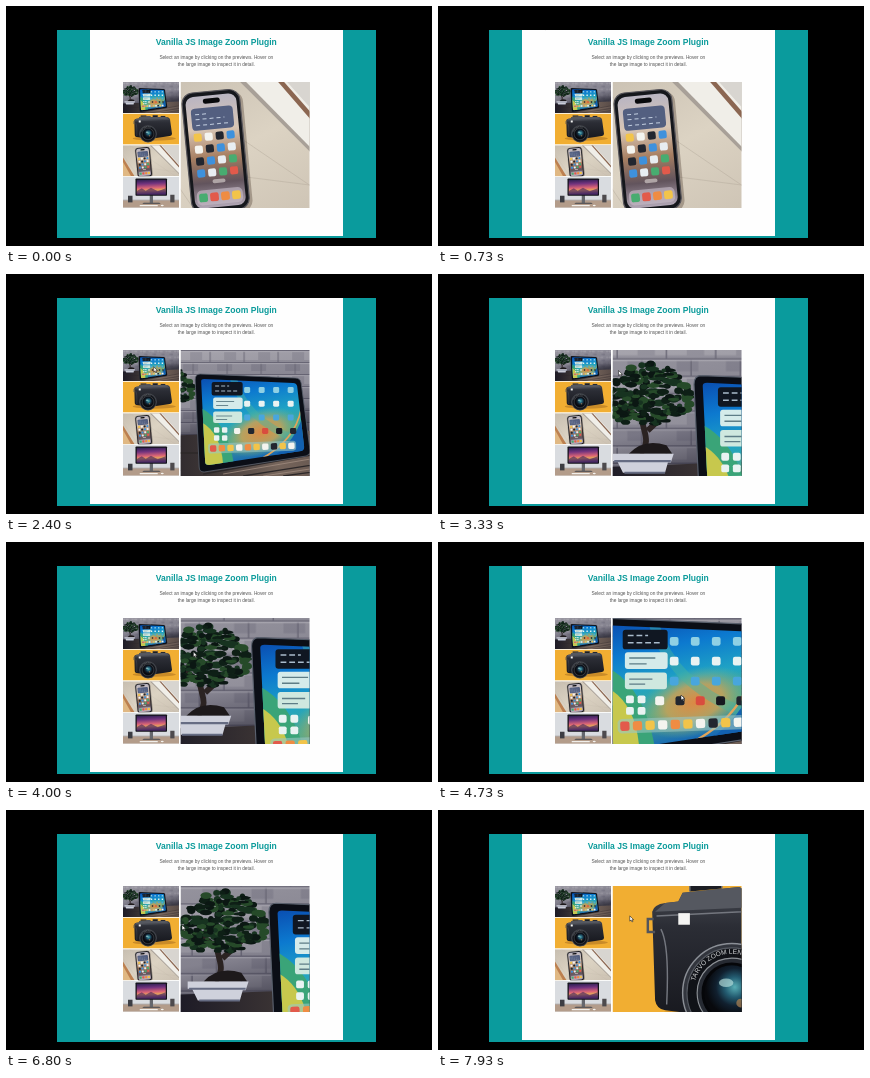
These frames come from a looping animation (426 px wide and 240 px high, 8 s). An HTML page:

```html
<!DOCTYPE html>
<html lang="en">
<head>
<meta charset="utf-8">
<title>Image Zoom Plugin</title>
<style>
html, body { margin: 0; width: 100%; height: 100%; overflow: hidden; background: #000; }
svg { display: block; }
#stage { width: 100vw; height: 100vh; }
text { font-family: "Liberation Sans", Arial, sans-serif; }
</style>
</head>
<body>
<svg id="stage" viewBox="0 0 426 240">
<defs>
  <clipPath id="page"><rect x="51" y="24" width="319" height="208"/></clipPath>
  <clipPath id="photo"><rect width="224" height="126"/></clipPath>
  <clipPath id="viewer"><rect x="174.8" y="76" width="128.7" height="126"/></clipPath>
  <pattern id="bricks" width="34" height="24" patternUnits="userSpaceOnUse">
    <rect width="34" height="24" fill="#a3a1aa"/>
    <rect x="1" y="2" width="22" height="8" fill="#b5b3ba"/>
    <rect x="16" y="14" width="15" height="7" fill="#94929d"/>
    <path d="M0 .5H34M0 12.5H34M9 0V12M26 12V24" stroke="#777582" stroke-width="1"/>
    <path d="M0 1.6H34M0 13.6H34" stroke="#cac8ce" stroke-width=".7"/>
  </pattern>
  <linearGradient id="wallShade" x2=".3" y2="1">
    <stop offset="0" stop-color="#211f35" stop-opacity=".08"/>
    <stop offset=".5" stop-color="#25233a" stop-opacity=".25"/>
    <stop offset=".8" stop-color="#161522" stop-opacity=".75"/>
  </linearGradient>
  <linearGradient id="table">
    <stop offset="0" stop-color="#1d1b26"/><stop offset=".35" stop-color="#3f3736"/>
    <stop offset=".65" stop-color="#76655b"/><stop offset="1" stop-color="#594c48"/>
  </linearGradient>
  <linearGradient id="wallpaper" x2=".25" y2="1">
    <stop offset="0" stop-color="#0a4fb2"/><stop offset=".25" stop-color="#0c79cf"/>
    <stop offset=".52" stop-color="#20a4c4"/><stop offset=".75" stop-color="#4aa78c"/><stop offset="1" stop-color="#1768b5"/>
  </linearGradient>
  <radialGradient id="glow">
    <stop offset="0" stop-color="#dc8844"/><stop offset=".5" stop-color="#d2a152" stop-opacity=".8"/>
    <stop offset="1" stop-color="#7cba80" stop-opacity="0"/>
  </radialGradient>
  <linearGradient id="sand" x2="1" y2="1">
    <stop offset="0" stop-color="#c7beb0"/><stop offset=".5" stop-color="#dcd3c3"/><stop offset="1" stop-color="#cbc1b2"/>
  </linearGradient>
  <linearGradient id="phoneScreen" x2="0" y2="1">
    <stop offset="0" stop-color="#b9b5c2"/><stop offset=".3" stop-color="#d8c6b5"/>
    <stop offset=".55" stop-color="#a77f62"/><stop offset=".78" stop-color="#62545d"/><stop offset="1" stop-color="#b1a6b5"/>
  </linearGradient>
  <linearGradient id="body" x2="0" y2="1">
    <stop offset="0" stop-color="#454850"/><stop offset=".3" stop-color="#2b2d35"/><stop offset="1" stop-color="#17181e"/>
  </linearGradient>
  <radialGradient id="glass" cx=".55" cy=".4">
    <stop offset="0" stop-color="#58aeb5"/><stop offset=".35" stop-color="#235b70"/>
    <stop offset=".65" stop-color="#11202f"/><stop offset="1" stop-color="#08090d"/>
  </radialGradient>
  <linearGradient id="sunset" x2=".1" y2="1">
    <stop offset="0" stop-color="#29204f"/><stop offset=".3" stop-color="#72337e"/>
    <stop offset=".6" stop-color="#db6576"/><stop offset=".75" stop-color="#e4a05c"/><stop offset="1" stop-color="#4a2b72"/>
  </linearGradient>

  <g id="tablet" clip-path="url(#photo)">
    <rect width="224" height="126" fill="url(#bricks)"/>
    <rect width="224" height="126" fill="url(#wallShade)"/>
    <path d="M0 87 224 79V126H0Z" fill="url(#table)"/>
    <path d="M70 124 224 97M110 126 224 108M150 126 224 116M0 103H65" stroke="#2c2829" stroke-width="1.3"/>
    <path d="M90 124 224 101M130 126 224 112" stroke="#a08c7f" stroke-width=".8"/>
    <path d="M25 78C35 66 22 60 28 47M30 62 44 49M27 55 13 45" fill="none" stroke="#2b2322" stroke-width="4"/>
    <g id="leaves"></g>
    <path d="M17 78Q27 67 43 72L47 78Z" fill="#1d191b"/>
    <path d="M6 78H48L46 84H44L42 91H13L9 83H6Z" fill="#cfd1dc"/>
    <path d="M7 83H46M14 91H42" stroke="#666c83" stroke-width="1.4"/>
    <path d="M67 24 162 28Q167 28 168 33L177 101Q177 105 173 106L71 122Q66 122 66 117L62 30Q62 24 67 24Z" fill="#0b0e16" stroke="#59606d" stroke-width=".8"/>
    <path id="screen" d="M68 31Q68 29 71 29L160 33Q163 33 164 36L171 97Q171 100 168 101L76 115Q72 115 72 112Z" fill="url(#wallpaper)"/>
    <clipPath id="screenClip"><use href="#screen"/></clipPath>
    <g clip-path="url(#screenClip)">
      <ellipse cx="128" cy="82" rx="40" ry="23" fill="url(#glow)" transform="rotate(-18 128 82)"/>
      <path d="M68 58Q94 72 101 115H68Z" fill="#3aa478"/>
      <path d="M68 72Q88 83 90 115H68Z" fill="#c7c84d"/>
      <path d="M100 28Q112 70 164 90" fill="none" stroke="#45b3a0" stroke-width="7" opacity=".45"/>
      <path d="M172 55Q166 92 132 112H175Z" fill="#1260af"/>
      <path d="M168 59Q162 91 126 110" fill="none" stroke="#e0a45a" stroke-width="1.6"/>
      <rect x="78.5" y="32" width="31" height="13.5" rx="2" fill="#101722"/>
      <rect x="80" y="47.5" width="29.5" height="11.5" rx="2" fill="#d5ebea"/>
      <rect x="80" y="61.5" width="29" height="11.5" rx="2" fill="#cfe8df"/>
      <path d="M82 36H96M82 41H106" stroke="#a9bbcb" stroke-dasharray="4 2"/>
      <path d="M83 51.5H101M83 55.5H95M83 66H99M83 69.5H94" stroke="#5e7d86" stroke-width=".9"/>
      <g id="tabletApps"></g>
      <g transform="rotate(-2 80 98.5)">
        <rect x="75" y="93.5" width="88" height="10" rx="3" fill="#9cc7c1" opacity=".6"/>
        <g id="tabletDock"></g>
      </g>
    </g>
  </g>

  <g id="camera" clip-path="url(#photo)">
    <rect width="224" height="126" fill="#f1ae32"/>
    <ellipse cx="125" cy="101" rx="86" ry="9" fill="#a96f22" opacity=".55"/>
    <path d="M45 27Q46 22 54 21L63 20 66 14 105 10 113 14 176 14Q186 15 188 23L196 82Q196 89 188 91L112 102 54 95Q48 94 47 88Z" fill="url(#body)"/>
    <path d="M63 20 66 14 105 10 113 14 174 14 181 21 47 27 54 21Z" fill="#555860"/>
    <path d="M48 30 187 23M51 39Q57 50 55 91" fill="none" stroke="#74777f" stroke-width="1"/>
    <path d="M71 13V8H93V11M119 14V7H139V14M151 14V10H169V14" fill="#1c1e24" stroke="#656970"/>
    <path d="M46 32H42V41H47" fill="none" stroke="#53555c" stroke-width="1.7"/>
    <rect x="63" y="28" width="8" height="8" fill="#f4f4f2"/>
    <circle cx="100" cy="83" r="34" fill="#32353d" stroke="#8b8f96"/>
    <circle cx="100" cy="83" r="31" fill="#101217" stroke="#555961" stroke-width=".8"/>
    <path id="ring" d="M74.5 75A26.5 26.5 0 0 1 125 74" fill="none"/>
    <text font-size="4.6" fill="#d7d9db"><textPath href="#ring">TARVO ZOOM LENS</textPath></text>
    <circle cx="100" cy="83" r="24" fill="#262a32" stroke="#8b8f94" stroke-width=".8"/>
    <circle cx="100" cy="83" r="20" fill="url(#glass)" stroke="#050609" stroke-width="2"/>
    <ellipse cx="96" cy="76" rx="5" ry="3" fill="#b8e0de" opacity=".65"/>
    <circle cx="106" cy="90" r="3" fill="#b08353" opacity=".7"/>
  </g>

  <g id="phone" clip-path="url(#photo)">
    <rect width="224" height="126" fill="url(#sand)"/>
    <path d="M0 38 60 126M25 0 210 126M0 80 45 126M105 94 224 109" stroke="#b1a798" stroke-width=".7" opacity=".6"/>
    <path d="M0 50 46 126H0Z" fill="#bc8050"/>
    <path d="M0 68 32 126H0Z" fill="#e0b883"/>
    <path d="M107 0H224V117Z" fill="#a8a098"/>
    <path d="M113 0H224V113Z" fill="#f0eee8"/>
    <path d="M145 0H151L224 83V91Z" fill="#8b6651"/>
    <path d="M154 0H224V78Z" fill="#d8d5d0"/>
    <g transform="translate(82.5 69) rotate(-5.5)">
      <rect x="-28" y="-58" width="60" height="121" rx="11" fill="#69594c" opacity=".45"/>
      <rect x="-29" y="-60" width="58" height="120" rx="11" fill="#15171c" stroke="#56545a" stroke-width="1.2"/>
      <rect x="-25.5" y="-56" width="51" height="112" rx="8" fill="url(#phoneScreen)"/>
      <rect x="-8" y="-53" width="17" height="5" rx="2.5" fill="#08090c"/>
      <rect x="-21" y="-44" width="42" height="22" rx="4" fill="#535f80"/>
      <path d="M-17 -38H-4M-17 -33H12M-17 -27H16" stroke="#c2cedf" stroke-dasharray="4 3"/>
      <rect x="-6" y="28" width="13" height="4" rx="2" fill="#cfc6c5" opacity=".7"/>
      <rect x="-23" y="38" width="46" height="15" rx="5" fill="#c6bbc6" opacity=".65"/>
      <g id="phoneApps"></g>
    </g>
  </g>

  <g id="monitor" clip-path="url(#photo)">
    <rect width="224" height="126" fill="#d9dce0"/>
    <path d="M0 96H224V126H0Z" fill="#b39c8a"/>
    <path d="M0 95H224" stroke="#81756e" stroke-width="2"/>
    <rect x="107" y="72" width="13" height="34" fill="#65676d"/>
    <path d="M83 105H145L151 110H77Z" fill="#41434a"/>
    <rect x="50" y="7" width="126" height="70" rx="3" fill="#121218"/>
    <rect x="55" y="12" width="116" height="60" fill="url(#sunset)"/>
    <path d="M55 58 75 47 91 57 112 45 139 59 171 47V72H55Z" fill="#4b285f" opacity=".65"/>
    <path d="M67 115H139V120H67Z" fill="#f0eeea"/>
    <ellipse cx="157" cy="117" rx="6" ry="3" fill="#f4f2ee"/>
    <rect x="20" y="77" width="18" height="27" fill="#3c3d43"/>
    <rect x="189" y="73" width="17" height="31" fill="#4d4a4d"/>
  </g>
</defs>

<rect width="426" height="240" fill="#000"/>
<g clip-path="url(#page)">
  <rect x="51" y="24" width="319" height="208" fill="#0a9b9d"/>
  <rect x="84" y="24" width="253" height="206" fill="#fefefe"/>
  <g text-anchor="middle">
    <text x="210.3" y="39.2" font-size="8.55" font-weight="700" fill="#0b9b9b">Vanilla JS Image Zoom Plugin</text>
    <g font-size="4.75" fill="#555">
      <text x="210.3" y="53">Select an image by clicking on the previews. Hover on</text>
      <text x="210.3" y="59.7">the large image to inspect it in detail.</text>
    </g>
  </g>
  <g id="thumbs"></g>
  <g clip-path="url(#viewer)"><use id="large" href="#phone"/></g>
  <path id="cursor" d="M0 0V5.2L1.3 4.1 2.2 6 3.1 5.6 2.2 3.8H3.9Z" fill="#fff" stroke="#111" stroke-width=".55"/>
</g>
</svg>
<script>
const $ = id => document.getElementById(id);
const LOOP = 8000, ZOOM = 1.45;
const view = { x: 174.8, y: 76, w: 128.7, h: 126 };
const colors = ['#f4f4ef', '#e25a4b', '#3e91dd', '#f2c44a', '#48ac70', '#22262f', '#ef8c43', '#e8edf1'];

const app = (x, y, size, color) =>
  `<rect x="${x - size / 2}" y="${y - size / 2}" width="${size}" height="${size}" rx="${size * .24}" fill="${color}"/>`;
function apps(cols, rows, x, y, dx, dy, size, shift, palette = colors) {
  return Array.from({ length: cols * rows }, (_, i) =>
    app(x + i % cols * dx, y + Math.floor(i / cols) * dy, size,
      palette[(i * 5 + (i >> 2) + shift) % palette.length])).join('');
}
const pale = ['#8fd0e4', '#e9f3f2', '#48a6dd', '#b9dfe2', '#f4f4ef'];
const dark = ['#16181f', '#f4f4ef', '#22262f', '#d94c3e'];
$('tabletApps').innerHTML = apps(4, 3, 114, 40, 14.5, 13.7, 6, 0, pale)
  + apps(5, 1, 104, 81, 14, 0, 6.2, 1, dark) + apps(2, 2, 83.5, 80, 8, 8, 5.4, 1, pale);
$('tabletDock').innerHTML = apps(10, 1, 80, 98.5, 8.7, 0, 6.4, 1);
$('phoneApps').innerHTML = apps(4, 4, -16.5, -15, 11, 12, 8, 3) + apps(4, 1, -16.5, 45.5, 11, 0, 8.6, 4);

let seed = 19;
const random = () => (seed = seed * 16807 % 2147483647) / 2147483647;
const greens = ['#0e1f16', '#173320', '#264a29', '#0b1713'];
$('leaves').innerHTML = Array.from({ length: 240 }, (_, i) => {
  const a = random() * Math.PI * 2, r = Math.sqrt(random());
  const x = 29 + Math.cos(a) * r * 31, y = 36 + Math.sin(a) * r * 21 + Math.abs(x - 31) * .16;
  return `<ellipse cx="${x}" cy="${y}" rx="${1.6 + random() * 3}" ry="${1 + random() * 1.6}" fill="${greens[i % 4]}"/>`;
}).join('');

$('thumbs').innerHTML = ['tablet', 'camera', 'phone', 'monitor'].map((id, i) =>
  `<use href="#${id}" transform="translate(117 ${76 + i * 31.6}) scale(.25 .2460)"/>`).join('');

// time, pointer x, pointer y
const path = [
  [0, 100, 14], [900, 106, 18], [1400, 131, 60.5], [1950, 144, 91], [2500, 148, 93],
  [2850, 170, 95], [3330, 180.5, 96.5], [3900, 185, 108], [4730, 243, 153],
  [5250, 262, 176], [5600, 260, 196], [6100, 231, 178], [6800, 176, 115],
  [7200, 147, 122], [7480, 148, 121], [7800, 178, 111], [8000, 197, 104]
];
function pointer(t) {
  const i = Math.max(1, path.findIndex(p => p[0] > t));
  const [t0, x0, y0] = path[i - 1], [t1, x1, y1] = path[i];
  const p = (t - t0) / (t1 - t0), e = p * p * (3 - 2 * p);
  return [x0 + (x1 - x0) * e, y0 + (y1 - y0) * e];
}

const start = performance.now();
function draw(now) {
  const t = Math.max(0, now - start) % LOOP;
  const [x, y] = pointer(t);
  const photo = t < 2300 ? 'phone' : t < 7350 ? 'tablet' : 'camera';
  const fx = (x - view.x) / view.w, fy = (y - view.y) / view.h;
  const inside = fx >= 0 && fx <= 1 && fy >= 0 && fy <= 1;
  const scale = inside ? ZOOM : 1;
  const left = view.x - (inside ? fx : .5) * (224 * scale - view.w);
  const top = view.y - (inside ? fy : .5) * (126 * scale - view.h);
  $('large').setAttribute('href', '#' + photo);
  $('large').setAttribute('transform', `translate(${left} ${top}) scale(${scale})`);
  $('cursor').setAttribute('transform', `translate(${x} ${y})`);
  requestAnimationFrame(draw);
}
draw(start);
</script>
</body>
</html>
```
